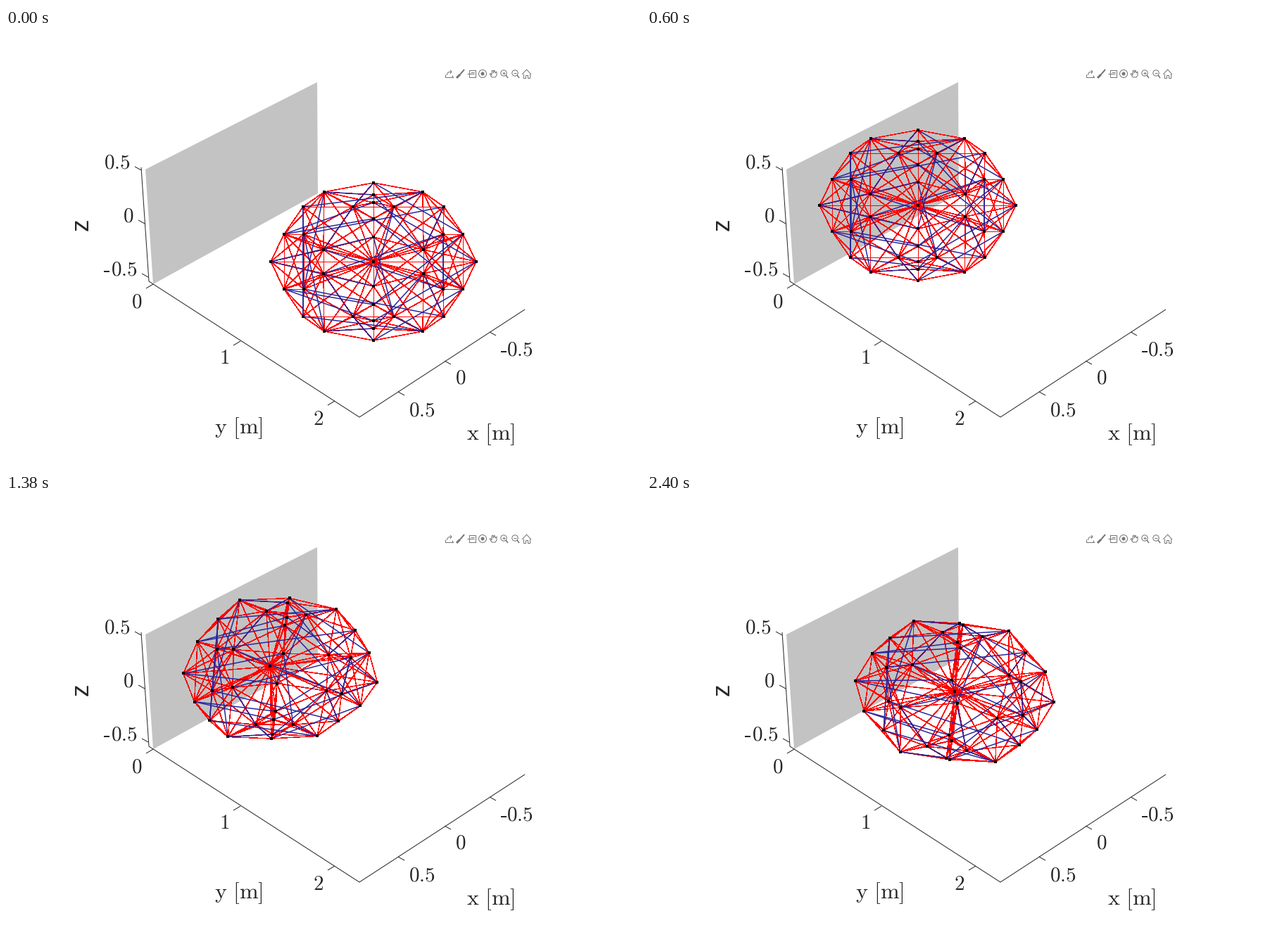
A matplotlib script that plays this animation: 902x621 px, repeating every 2460 ms.

```python
import itertools
import numpy as np
import matplotlib.pyplot as plt
from matplotlib.animation import FuncAnimation
from matplotlib.collections import LineCollection
from matplotlib.patches import Polygon, Circle, Rectangle

W, H, DPI = 902, 621, 100
FRAMES, STEP_MS = 41, 60
PX = 72 / DPI
INK, ICON = "#262626", "#757575"
TOUCH, STOP, FREE = 10, 15, 33      # steps: wall contact, turning point, relaxed
REACH = 90                          # longest cable between neighbours

plt.rcParams["mathtext.fontset"] = "cm"

# One node per family: screen offset from the hub, and depth
families = {
    "r": (146, 0, 0), "a": (70, -99, -4), "b": (29, -78, -11),
    "c": (100, -78, 4.5), "d": (127, -39, -6), "e": (99, -39, 11),
    "f": (71, -17, -15), "g": (0, -112, 4), "h": (0, -95, -9),
    "i": (0, -84, 6), "j": (0, -61, -7), "k": (0, -35, 15),
}

# Mirror each family left (-) and right (+); capitals are the lower half
nodes = {"hub": (0, 0, 0)}
for name, (dx, dy, q) in families.items():
    for side, m in (("-", -1), ("+", 1)):
        nodes[name + side] = (m * dx, dy, q)
        nodes[name.upper() + side] = (m * dx, -dy, -q)
ids = {name: n for n, name in enumerate(nodes)}
X, Y, Q = np.array(list(nodes.values()), float).T

# Bars of the upper half; swapping upper and lower gives the others
upper_bars = ("a-h- c-a+ e-c+ d-j- d-i- b-f- b-g- a-E- c-C- e+E+ "
              "r-k- c+f+ b+K- g-d+ h-f+ F-e+ r+I- d+J- a+b+").split()
bars = np.array([(ids[b[:2]], ids[b[2:]])
                 for bar in upper_bars for b in (bar, bar.swapcase())])

# Cables join near neighbours, and every node to the hub
cables = np.array([
    (a, b) for a, b in itertools.combinations(range(len(X)), 2)
    if a == 0 or 0 < np.hypot(X[a] - X[b], Y[a] - Y[b]) < REACH])

rest = np.column_stack([X, Y])
# Tilt kept after the bounce
tilted = np.column_stack([0.966 * X - 0.08 * Y - 0.45 * Q,
                          0.103 * X + 0.9 * Y + Q])
# Extra flattening against the wall
squash = np.column_stack([
    26 - 0.04 * X - 0.06 * Y + 0.9 * Q - 0.0007 * X * Y,
    5 - 0.11 * X + 0.03 * Y - 0.5 * Q - 0.0009 * X * Y + 24 * (X / 146) ** 2])
squash[0] = 0


def span(f, start, end):
    return np.clip((f - start) / (end - start), 0, 1)


def hub_at(f):
    start, velocity = np.array([522, 332]), np.array([-13.75, -8])
    turn, last = np.array([357, 236]), np.array([437, 282])
    if f <= STOP:
        u = span(f, TOUCH, STOP)
        touch = start + velocity * min(f, TOUCH)
        return touch + (turn - touch) * u * (2 - u)
    u = span(f, STOP, FRAMES - 1)
    return turn + (last - turn) * u * u * (2.8 - 1.8 * u)


def pose(f):
    u = span(f, TOUCH, STOP)
    hit = u * (2 - u)
    flying = rest * (1 - 0.0045 * min(f, TOUCH))
    shape = flying + (tilted - flying) * hit
    return hub_at(f) + shape + squash * hit * (1 - span(f, STOP, FREE))


fig = plt.figure(figsize=(W / DPI, H / DPI), dpi=DPI, facecolor="white")
ax = fig.add_axes([0, 0, 1, 1])
ax.set_xlim(0, W)
ax.set_ylim(H, 0)
ax.axis("off")


def line(*xy, color=INK, width=1.0):
    ax.plot(xy[::2], xy[1::2], color=color, lw=width * PX,
            solid_capstyle="butt", zorder=2)


def label(x, y, text, size=29):
    ax.text(x, y, r"$\mathrm{%s}$" % text, fontsize=size * PX, color=INK,
            ha="center", va="center")


def hyphen(x, y):
    ax.add_patch(Rectangle((x, y), 8, 2, fc=INK, lw=0))


def draw_axes():
    ax.add_patch(Polygon([(198, 201), (442, 77), (443, 235), (209, 364)],
                         fc="#c3c3c3", lw=0, zorder=1))
    line(192, 198, 203, 360, 502, 553, 737, 400)
    for x, y in [(192, 202), (197, 278), (202, 354),
                 (566, 522), (632, 478), (696, 437)]:
        line(x - 9, y - 5, x, y)
    for x, y in [(209, 364), (333, 445), (467, 530)]:
        line(x - 10, y + 6, x, y)
    for x, y, text in [(157.5, 191, "0.5"), (174, 268, "0"),
                       (168, 343, "0.5"), (186, 389, "0"), (310, 469, "1"),
                       (444, 556, "2"), (591, 543, "0.5"), (646, 498, "0"),
                       (730, 457, "0.5")]:
        label(x, y, text)
    hyphen(139, 345)
    hyphen(703, 459)
    label(330, 569, r"y\ [m]", 32)
    label(688.5, 578, r"x\ [m]", 32)
    ax.text(107.5, 279, "z", family="Liberation Sans", fontsize=35 * PX,
            color=INK, rotation=90, ha="center", va="center")


def icon(*xy, width=1.0):
    line(*xy, color=ICON, width=width)


def ring(x, y, r, fill="none"):
    ax.add_patch(Circle((x, y), r, fc=fill, ec=ICON, lw=PX))


def draw_toolbar():
    # export
    icon(624, 66, 624, 70, 634, 70, 634, 67)
    icon(626, 67, 628, 63, 633, 62)
    icon(631, 60, 633, 62, 631, 65)
    icon(634, 69, 636, 71)
    # brush
    icon(651, 59, 645, 66, width=2)
    icon(645, 66, 640, 71, width=3)
    # data tip
    icon(658, 60, 667, 60, 667, 70, 658, 70, 658, 60)
    icon(660, 63, 665, 63)
    icon(655, 65, 665, 65)
    # rotate
    ring(677, 65, 5.5)
    ring(677, 65, 2, ICON)
    # pan
    icon(690, 70, 687, 65, 689, 65, 690, 67, 690, 61, 692, 60, 692, 64,
         694, 60, 695, 64, 697, 62, 697, 67, 695, 70, 690, 70)
    # zoom in, zoom out
    for x in (707, 723):
        ring(x, 64, 4.2)
        icon(x + 3, 67, x + 6, 71, width=1.6)
        icon(x - 2, 64, x + 2, 64)
    icon(707, 62, 707, 66)
    # home
    icon(733, 66, 739.5, 59, 746, 66)
    icon(735, 65, 735, 71, 738, 71, 738, 67, 741, 67, 741, 71, 744, 71,
         744, 65)


draw_axes()
draw_toolbar()

# Hairlines without smoothing break up into dashes
red = LineCollection([], colors="#ff0000", linewidths=0.5 * PX,
                     antialiaseds=False, zorder=3)
blue = LineCollection([], colors="#26269c", linewidths=1.5 * PX, zorder=4)
ax.add_collection(red, autolim=False)
ax.add_collection(blue, autolim=False)
dots, = ax.plot([], [], "s", color="black", ms=4 * PX, mew=0, zorder=5)


def update(f):
    p = pose(f)
    red.set_segments(p[cables])
    blue.set_segments(p[bars])
    dots.set_data(p[:, 0], p[:, 1])
    return red, blue, dots


anim = FuncAnimation(fig, update, frames=FRAMES, interval=STEP_MS,
                     repeat=True, repeat_delay=0)
plt.show()
```
